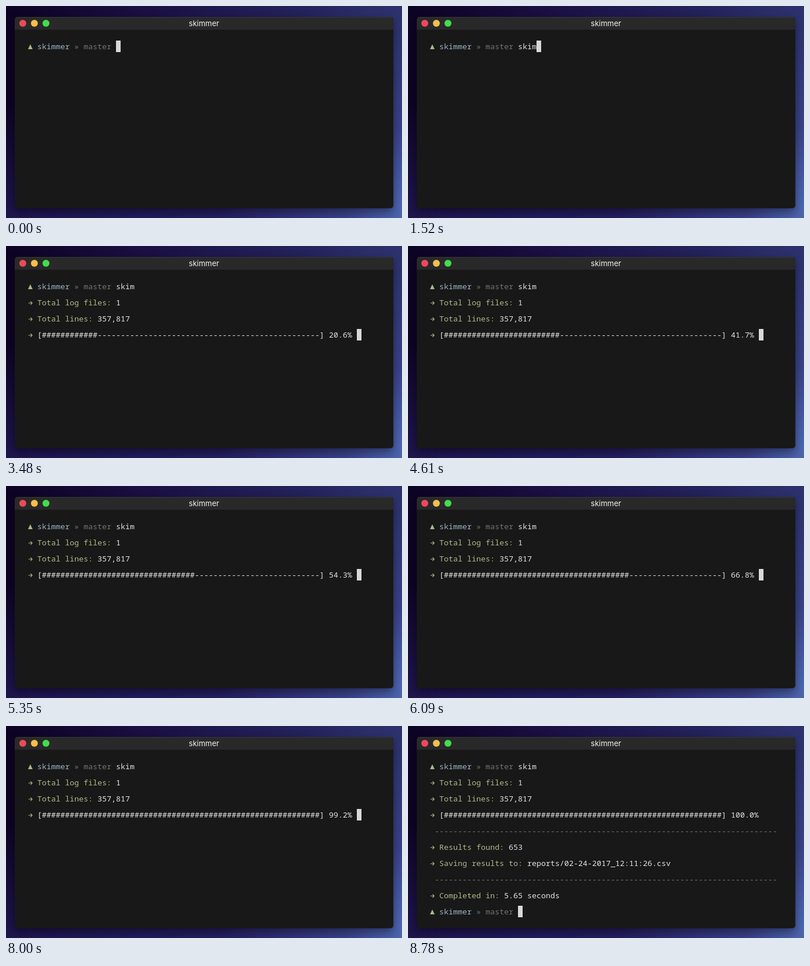
Recreate the animation shown at these times as an HTML page. Size 684x368 px, loop 8820 ms.

```html
<!DOCTYPE html>
<html lang="en">
<head>
<meta charset="utf-8">
<title>skimmer</title>
<style>
html, body { margin: 0; width: 100%; height: 100%; overflow: hidden; }
body {
  position: relative;
  background:
    radial-gradient(ellipse 330px 400px at 700px 350px, rgba(82,112,186,.95), rgba(70,88,165,.55) 35%, rgba(58,64,140,0)),
    linear-gradient(to bottom, rgba(36,27,92,0) 45%, rgba(40,32,104,.65)),
    linear-gradient(to right, #0d0322, #1a1043 35%, #25235c 75%, #2a2c64);
}
.window {
  position: absolute; left: 15px; top: 19px; width: 654px; height: 332px;
  border-radius: 5px; background: #181818; overflow: hidden;
}
.shadow {
  position: absolute; left: 15px; top: 19px; width: 654px; height: 332px;
  border-radius: 5px;
  box-shadow: 0 0 1px rgba(0,0,0,.7), 0 6px 16px rgba(0,0,0,.42);
}
.bar {
  height: 22px; background: #292929; box-shadow: inset 0 1px #383838;
  color: #f2f2f2; font: 13px/23px Inter, Roboto, sans-serif; text-align: center;
}
.light { position: absolute; top: 5px; width: 12px; height: 12px; border-radius: 50%; }
.row {
  position: absolute; left: 38px; height: 28px; white-space: pre;
  font: 13.333px/28px "Noto Sans Mono", "DejaVu Sans Mono", monospace;
  font-variant-ligatures: none; color: #e4e4e4;
}
.row svg { position: absolute; left: 0; top: 0; }
.label { color: #b0ba84; }
.dir { color: #9ab8ca; }
.dim { color: #747474; }
#cursor { position: absolute; width: 8px; height: 20px; background: #d9d9d9; }
</style>
</head>
<body>
<div class="shadow"></div>
<div class="window">
  <div class="bar">skimmer</div>
  <i class="light" style="left:8px;background:#f0495a"></i>
  <i class="light" style="left:28px;background:#f5be4b"></i>
  <i class="light" style="left:48px;background:#3fdf4b"></i>
</div>
<div id="screen"></div>
<div id="cursor"></div>
<script>
const LOOP = 8820, CELL = 8, LEFT = 38, TOP = 60, LINE = 28, BAR = 60;
const KEYS = [1090, 1210, 1340, 1470];
const ENTER = 2250, FILES = 2285, LINES = 2310, START = 2327, DONE = 8040;
const PROGRESS = [[START, 0], [2480, 2.8], [4610, 41.7], [6090, 66.8], [7170, 85.2], [DONE, 100]];

const screen = document.getElementById('screen');
const cursor = document.getElementById('cursor');

const span = (kind, text) => `<span class="${kind}">${text}</span>`;
const icon = body => `<svg width="8" height="28">${body}</svg>  `;
const triangle = icon('<path d="M0 19L4 10.5L8 19Z" fill="#a6b985"/>');
const arrow = icon('<path d="M.8 15H7M4.4 12.2L7.2 15L4.4 17.8" fill="none" stroke="#b0ba84" stroke-width="1.2"/>');
const prompt = triangle + span('dir', 'skimmer') + span('dim', ' » master ');
const info = (label, value) => arrow + span('label', label) + ' ' + value;
const rule = span('dim', ' ' + '-'.repeat(74));

// [time the line appears, markup]
const rows = [
  [0, prompt + '<span id="typed"></span>'],
  [FILES, info('Total log files:', '1')],
  [LINES, info('Total lines:', '357,817')],
  [START, arrow + '<span id="meter"></span>'],
  [8060, rule],
  [8060, info('Results found:', '653')],
  [8060, info('Saving results to:', 'reports/02-24-2017_12:11:26.csv')],
  [8100, rule],
  [8100, info('Completed in:', '5.65 seconds')],
  [8140, prompt]
].map(([at, html], i) => {
  const el = document.createElement('div');
  el.className = 'row';
  el.style.top = TOP - 4 + i * LINE + 'px';
  el.innerHTML = html;
  screen.append(el);
  return { at, el };
});
const typed = document.getElementById('typed');
const meter = document.getElementById('meter');

// The counter advances in short discrete ticks between known readings.
function percentAt(t) {
  if (t >= DONE) return 100;
  const i = PROGRESS.findIndex(([time]) => time > t);
  if (i < 1) return 0;
  const [t0, a] = PROGRESS[i - 1], [t1, b] = PROGRESS[i];
  const ticks = Math.round((t1 - t0) / 46);
  return a + (b - a) * Math.floor(ticks * (t - t0) / (t1 - t0)) / ticks;
}

function meterText(p) {
  const full = Math.round(p * BAR / 100);
  return `[${'#'.repeat(full)}${'-'.repeat(BAR - full)}] ${p.toFixed(1)}%`;
}

function cursorCell(t, count, text) {
  if (t < ENTER) return [19 + count, 0];
  if (t < FILES) return [0, 1];
  if (t < LINES) return [0, 2];
  if (t < START) return [0, 3];
  if (t < 8060) return [3 + text.length, 3];
  if (t < 8100) return [0, 7];
  if (t < 8140) return [0, 9];
  return [19, 9];
}

function draw(t) {
  const count = KEYS.filter(k => k <= t).length;
  const text = meterText(percentAt(t));
  typed.textContent = 'skim'.slice(0, count);
  meter.textContent = text;
  for (const { at, el } of rows) el.style.visibility = t >= at ? 'visible' : 'hidden';
  const [col, line] = cursorCell(t, count, text);
  cursor.style.left = LEFT + col * CELL + 'px';
  cursor.style.top = TOP + line * LINE + 'px';
}

const begin = performance.now();
function tick() {
  draw((performance.now() - begin) % LOOP);
  requestAnimationFrame(tick);
}
tick();
</script>
</body>
</html>
```
